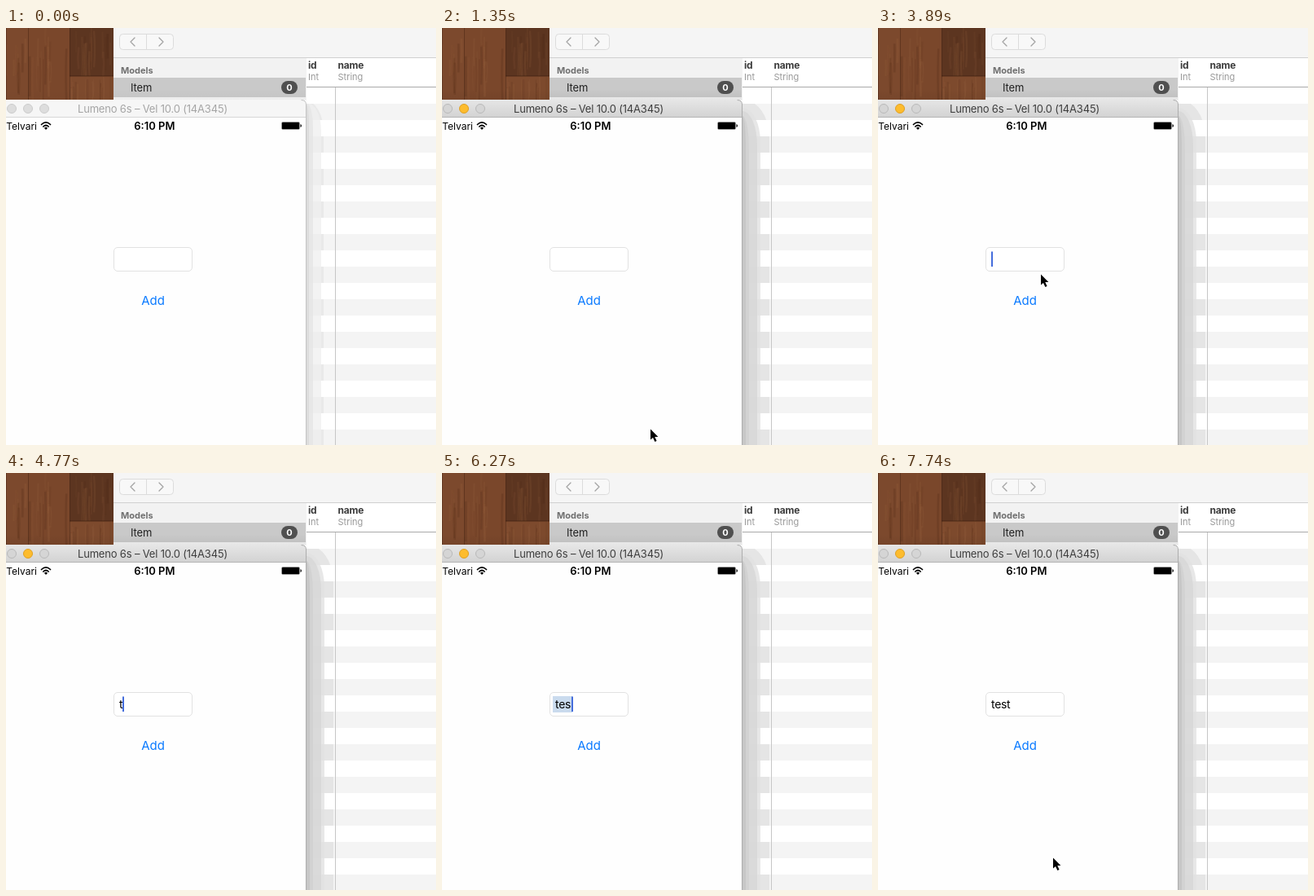
Recreate the animation shown at these times as an HTML page. Size 528 by 512 pixels, loop 8000 ms.

```html
<!DOCTYPE html>
<html lang="en">
<head>
<meta charset="utf-8">
<title>Adding an item</title>
<style>
  html, body { margin: 0; width: 528px; height: 512px; overflow: hidden; background: #fff; }
  svg { display: block; }
  text { font-family: Inter, Roboto, "Liberation Sans", sans-serif; white-space: pre; }
  .bold { font-weight: 700; }
  .note { font-size: 11px; fill: #999; }
  .line { fill: none; stroke-linecap: round; stroke-linejoin: round; }
</style>
</head>
<body>
<svg width="528" height="512" viewBox="0 0 528 512">
  <defs>
    <linearGradient id="bar" x2="0" y2="1">
      <stop offset="0" stop-color="#e6e6e6"/><stop offset="1" stop-color="#d2d2d2"/>
    </linearGradient>
    <linearGradient id="shade" x2="0" y2="1">
      <stop offset="0" stop-opacity="0"/><stop offset="1" stop-opacity=".05"/>
    </linearGradient>
    <clipPath id="wood"><rect width="132" height="89"/></clipPath>
    <clipPath id="below"><rect x="369" y="93" width="60" height="419"/></clipPath>
    <clipPath id="odd"><path id="oddRows"/></clipPath>
  </defs>

  <g id="planks" clip-path="url(#wood)"></g>

  <!-- toolbar and sidebar -->
  <rect x="132" width="396" height="37" fill="#f5f5f5"/>
  <rect x="132" y="37" width="237" height="52" fill="#f2f2f2"/>
  <rect x="132" y="36" width="396" height="1" fill="#d0d0d0"/>
  <rect x="139.5" y="7.5" width="66" height="19" rx="4" fill="#f8f8f8" stroke="#dcdcdc"/>
  <path d="M172.5 8V26" stroke="#dcdcdc"/>
  <path class="line" d="M158 12L153 17L158 22M188 12L193 17L188 22" stroke="#a2a2a2" stroke-width="1.3"/>
  <text class="bold" x="141" y="56" font-size="11" fill="#707070">Models</text>
  <rect x="132" y="61" width="236" height="24" fill="#c9c9c9"/>
  <text x="153" y="78" font-size="13" letter-spacing="-.1" fill="#222">Item</text>
  <rect x="338" y="65" width="20" height="16" rx="8" fill="#505050"/>
  <text class="bold" x="348" y="77" font-size="11" fill="#fff" text-anchor="middle">0</text>

  <!-- table -->
  <rect x="369" y="37" width="159" height="475" fill="#fff"/>
  <path id="stripes" fill="#f4f4f4"/>
  <g id="shadowOff"></g>
  <g id="shadowOn"></g>
  <path d="M404.5 73V512" stroke="#c6c6c6"/>
  <path d="M369 72.5H528" stroke="#a9a9a9"/>
  <g font-size="12" letter-spacing="-.2" fill="#3c3c3c">
    <text class="bold" x="371" y="50">id</text>
    <text class="bold" x="407.5" y="50">name</text>
  </g>
  <text class="note" x="371" y="64">Int</text>
  <text class="note" x="407.5" y="64">String</text>

  <!-- simulator window -->
  <rect id="topShade" y="75" width="368" height="13" fill="url(#shade)"/>
  <path d="M0 88H363Q368 88 368 93V512H0Z" fill="#fefefe"/>
  <path id="titleBar" d="M0 88H363Q368 88 368 93V110H0Z"/>
  <path id="titleEdge" d="M0 109.5H368"/>
  <path id="frame" class="line" d="M363 88.5Q368.5 88.5 368.5 94V512"/>
  <g id="lights"></g>
  <text id="title" x="180" y="104" font-size="13" letter-spacing="-.18" text-anchor="middle">Lumeno 6s – Vel 10.0 (14A345)</text>

  <text x="38" y="125" font-size="12" text-anchor="end">Telvari</text>
  <path class="line" d="M43.5 118.5Q49 113.3 54.5 118.5M45.8 121Q49 118 52.2 121" stroke="#000" stroke-width="1.7"/>
  <path d="M49 125L46.9 122.7Q49 121 51.1 122.7Z"/>
  <text x="182.4" y="125" font-size="13" font-weight="600" text-anchor="middle">6:10 PM</text>
  <rect x="338.5" y="115.5" width="22" height="9" rx="1.5" fill="none" stroke="#000" stroke-opacity=".4"/>
  <rect x="339" y="116" width="21" height="8" rx=".5"/>
  <path d="M361.5 118V122Q363 121.5 363 120T361.5 118Z"/>

  <rect x="132.5" y="269.5" width="96" height="29" rx="4.5" fill="#fff" stroke="#e2e2e2"/>
  <rect id="mark" x="136" y="274" height="20" fill="#cadbee"/>
  <text id="typed" x="139" y="289" font-size="14" letter-spacing="-.3"></text>
  <rect id="caret" y="274.5" width="2" height="18.5" fill="#456ddc"/>
  <text x="180.5" y="339.5" font-size="15" fill="#0a7aff" text-anchor="middle">Add</text>
  <rect id="bubble" x="132.5" y="505.5" width="58" height="30" rx="13" fill="#fff" stroke="#e6e6e6"/>

  <path id="cursor" d="M1 1.5V14.6L4 11.9L6.4 17L8.6 16L6.3 11.1H10.4Z" stroke="#fff" stroke-width="1.8" paint-order="stroke"/>
</svg>

<script>
const $ = id => document.getElementById(id);
const LOOP = 8000;

function set(node, attrs) {
  for (const key in attrs) node.setAttribute(key, attrs[key]);
}
function add(parent, tag, attrs) {
  const node = document.createElementNS("http://www.w3.org/2000/svg", tag);
  set(node, attrs);
  return parent.appendChild(node);
}
function show(node, on) {
  node.style.display = on ? "" : "none";
}

function drawStripes() {
  let d = "";
  for (let y = 93; y < 512; y += 40) d += `M369 ${y}H528V${y + 20}H369Z`;
  set($("stripes"), { d });
  set($("oddRows"), { d });
}

// Each band: reach, top, corner height, colour; the first one falls on grey rows only.
function drawShadow(group, bands) {
  bands.forEach(([reach, top, corner, fill], i) => add(group, "path", {
    d: `M369 ${top}A${reach} ${corner} 0 0 1 ${369 + reach} ${top + corner}V512H369Z`,
    fill,
    "fill-opacity": .8,
    "clip-path": i ? "url(#below)" : "url(#odd)"
  }));
}

function drawPlanks() {
  let seed = 11;
  const rand = () => (seed = seed * 16807 % 2147483647) / 2147483647;
  const g = $("planks");
  const planks = [
    [0, 0, 27, 89, "#7c492d"], [27, 0, 51, 89, "#7a472b"],
    [78, 0, 54, 59, "#5c3520"], [78, 59, 54, 30, "#7d4a2d"]
  ];
  for (const [x, y, w, h, fill] of planks) {
    add(g, "rect", { x, y, width: w, height: h, fill });
    for (let i = 0; i < w / 3; i++) {
      const gx = x + 1 + rand() * (w - 3), top = y + rand() * h * .5;
      const len = Math.min(y + h - top, 20 + rand() * 60), sway = rand() * 4 - 2;
      add(g, "path", {
        d: `M${gx} ${top}q${sway} ${len / 2} 0 ${len}`, fill: "none",
        stroke: rand() < .5 ? "#43200f" : "#a06a45",
        "stroke-opacity": .06 + rand() * .14, "stroke-width": 1 + rand() * 2
      });
    }
    add(g, "path", { d: `M${x + .5} ${y}v${h}`, stroke: "#3d1f10", "stroke-opacity": .4 });
  }
  add(g, "path", { d: "M78 59H132", stroke: "#351a0d", "stroke-opacity": .6 });
}

drawStripes();
drawPlanks();
drawShadow($("shadowOff"), [
  [21, 90, 38, "#e6e6e6"], [18, 92, 34, "#f0f0f0"], [8, 92, 30, "#e6e6e6"], [3, 94, 28, "#dadada"]
]);
drawShadow($("shadowOn"), [
  [33, 88, 46, "#e2e2e2"], [22, 98, 42, "#e2e2e2"], [18, 102, 42, "#d8d8d8"],
  [8, 108, 40, "#d1d1d1"], [4, 108, 40, "#c5c5c5"]
]);
const lights = [7, 27, 47].map(cx => add($("lights"), "circle", { cx, cy: 99, r: 5.5 }));

// time, x, y (no place: hidden)
const pointer = [
  [0], [600, 255, 491],
  [1650, 253, 484], [1797, 242, 444], [1945, 221, 363], [2092, 205, 304], [2240, 200, 288],
  [3887, 199, 301], [4035, 198, 338], [4182, 198, 363], [4330],
  [7600, 214, 475], [7740, 214, 471]
];
// time, text, caret x, caret opacity, highlight width
const typing = [
  [0, "", 139, 0, 0], [3740, "", 139, .5, 0], [3887, "", 139, 1, 0],
  [4630, "t", 139, 1, 0], [4770, "t", 143, 1, 0],
  [5370, "te", 143, 1, 0], [5520, "te", 151, 1, 0], [5670, "te", 151, 1, 16],
  [6120, "tes", 151, 1, 16], [6270, "tes", 159, 1, 24],
  [6860, "test", 162.5, 1, 28], [7010, "test", 162.5, 1, 0],
  [7450, "test", 162.5, .6, 0], [7600, "test", 162.5, .25, 0], [7740, "test", 162.5, 0, 0]
];
const at = (steps, t) => steps.filter(step => step[0] <= t).pop();

function setActive(on) {
  show($("shadowOff"), !on);
  show($("shadowOn"), on);
  set($("topShade"), { opacity: on ? 1 : .4 });
  set($("titleBar"), { fill: on ? "url(#bar)" : "#f6f6f6" });
  set($("titleEdge"), { stroke: on ? "#b4b4b4" : "#d6d6d6" });
  set($("frame"), { stroke: on ? "#adadad" : "#c3c3c3" });
  set($("title"), { fill: on ? "#3e3e3e" : "#a5a5a5" });
  lights.forEach((light, i) => {
    const amber = on && i === 1;
    set(light, {
      fill: amber ? "#fdbc2e" : on ? "#d5d5d5" : "#dddddd",
      stroke: amber ? "#dfa023" : on ? "#b9b9b9" : "#cccccc"
    });
  });
}

function render(t) {
  setActive(t >= 1350);
  const [, x, y] = at(pointer, t);
  show($("cursor"), x !== undefined);
  if (x !== undefined) set($("cursor"), { transform: `translate(${x} ${y})` });

  const [, text, caretX, alpha, width] = at(typing, t);
  if ($("typed").textContent !== text) $("typed").textContent = text;
  set($("caret"), { x: caretX, opacity: alpha });
  set($("mark"), { width });
  show($("bubble"), t >= 6860 && t < 7150);
}

const start = performance.now();
function tick() {
  render((performance.now() - start) % LOOP);
  requestAnimationFrame(tick);
}
tick();
</script>
</body>
</html>
```
